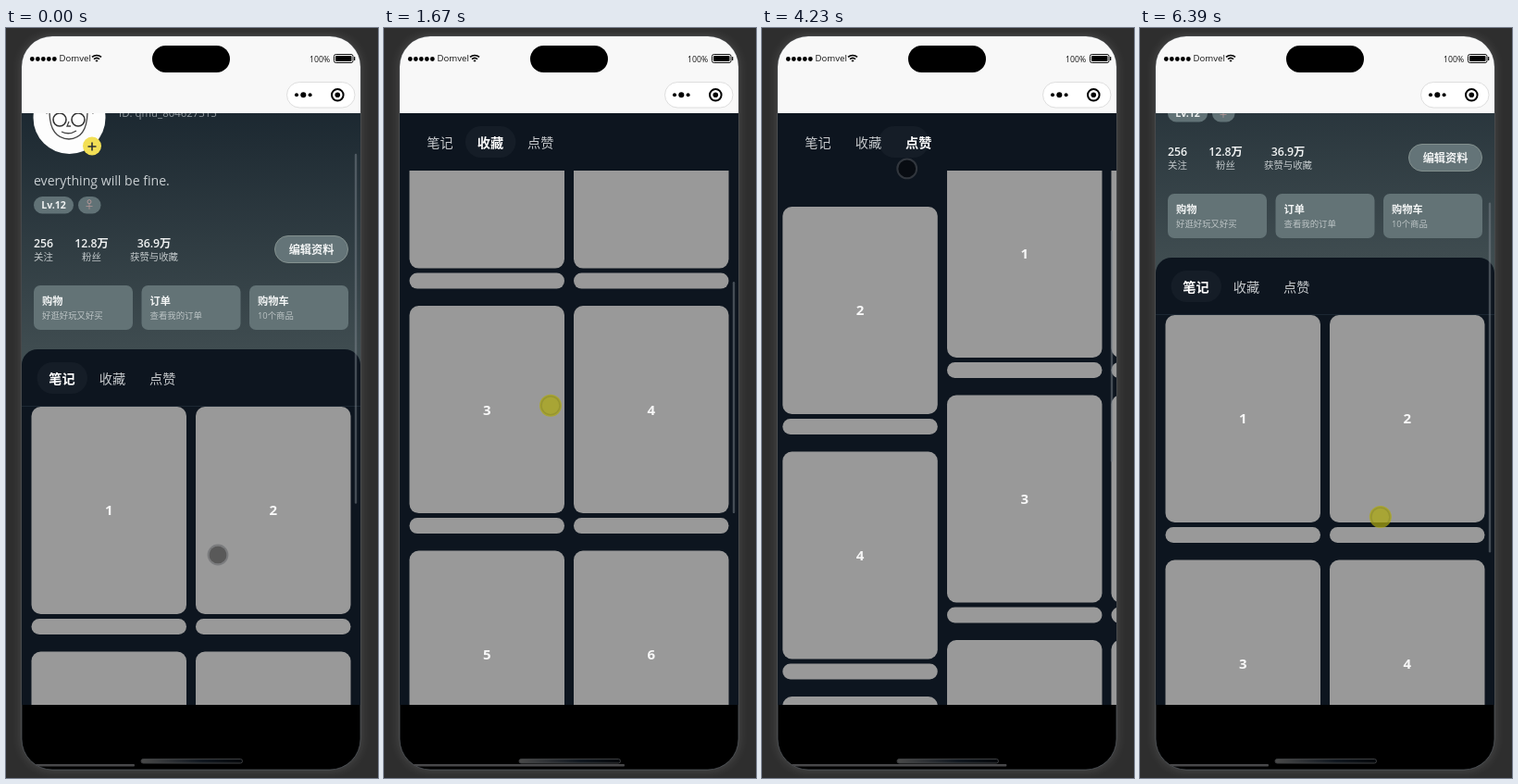
Write an HTML page with a canvas that moves like this. It is 402x810 px and loops after 6.46 s.

```html
<!DOCTYPE html>
<html lang="zh">
<head>
<meta charset="utf-8">
<style>
html, body { margin: 0; width: 100%; height: 100%; overflow: hidden; background: #2e2e2e; }
canvas { display: block; }
</style>
</head>
<body>
<canvas id="stage" width="402" height="810"></canvas>
<script>
const g = document.getElementById('stage').getContext('2d');
const LOOP = 6460, SLIDE = 500, LINGER = 510;
const LEFT = 17, WIDTH = 366, VIEW_TOP = 92, VIEW_BOTTOM = 731;
const STICK = 337, PAGE = 355.2, SHALLOW = 359, MID = 433, DEEP = 1130;
const TAB_X = 60.5, TAB_STEP = 54.4;
const FONT = '"Open Sans", "Noto Sans CJK SC", "Noto Sans CJK", sans-serif';

// A scene opens a tab at a scroll position; a hand with two points [time, x, y] drags the page
const scenes = [
  { at: 0, tab: 0, scroll: [82, MID], hand: [[100, 229, 569], [460, 232, 218]] },
  { at: 1040, tab: 1, scroll: [MID, DEEP], hand: [[1400, 180, 590], [1950, 180, 220]] },
  { at: 2080, tab: 2, scroll: [SHALLOW], hand: [[2430, 173, 245]] },
  { at: 3148, tab: 1, scroll: [DEEP], hand: [[3400, 112, 152]] },
  { at: 4124, tab: 2, scroll: [SHALLOW], hand: [[4230, 157, 152]] },
  { at: 4640, tab: 0, scroll: [DEEP], hand: [[5140, 70, 126]] },
  { at: 5500, tab: 0, scroll: [MID, 82], hand: [[5800, 250, 279], [LOOP, 261, 557]] }
];
scenes.forEach((s, i) => {
  s.from = i ? scenes[i - 1].tab : 0;
  s.tap = s.from !== s.tab;
});

const tabX = i => TAB_X + i * TAB_STEP;
const handPath = scenes.flatMap(({ at, tab, tap, hand }) => {
  const [, x, y] = hand[0];
  const opening = tap ? [[at - 80, tabX(tab) + 3, 128], [at, tabX(tab) + 3, 128]] : [[at, x, y]];
  return [...opening, ...hand];
});

const mix = (a, b, u) => a + (b - a) * u;

function handAt(t) {
  const i = handPath.findIndex(p => p[0] > t), a = handPath[i - 1], b = handPath[i];
  const u = (t - a[0]) / (b[0] - a[0]);
  return [mix(a[1], b[1], u), mix(a[2], b[2], u)];
}

function stateAt(t) {
  const scene = scenes.findLast(s => s.at <= t), { at, tab, from, hand } = scene;
  const [start, end = start] = hand.map(p => p[0]);
  const drag = Math.min(1, Math.max(0, (t - start) / (end - start || 1)));
  const [a, b = a] = scene.scroll;
  const left = 1 - Math.min(1, (t - at) / SLIDE);
  const dragging = end > start && t > start;
  return {
    tab,
    scroll: mix(a, b, drag ** 3),
    page: mix(tab, from, left ** 3),
    pill: mix(tab, from, left ** 5),
    back: tab < from,
    recent: t < (dragging ? end : at) + LINGER,
    pressed: dragging && t < end || scenes.some(s => s.tap && Math.abs(t - s.at + 30) < 60)
  };
}

function path(x, y, w, h, r) {
  g.beginPath();
  g.roundRect(x, y, w, h, r);
}
function line(color, width) {
  g.strokeStyle = color;
  g.lineWidth = width;
  g.stroke();
}
function box(x, y, w, h, r, fill, stroke) {
  path(x, y, w, h, r);
  g.fillStyle = fill;
  g.fill();
  if (stroke) line(stroke, 1);
}
function disc(x, y, r, fill) {
  g.beginPath();
  g.arc(x, y, r, 0, 7);
  g.fillStyle = fill;
  g.fill();
}
function ring(x, y, r, color, width) {
  g.beginPath();
  g.arc(x, y, r, 0, 7);
  line(color, width);
}
function curve(d, color, width) {
  g.strokeStyle = color;
  g.lineWidth = width;
  g.stroke(new Path2D(d));
}
function text(s, x, y, size, color, weight = 400, align = 'left') {
  g.font = `${weight} ${size}px ${FONT}`;
  g.textAlign = align;
  g.fillStyle = color;
  g.fillText(s, x, y + size * .36);
}
function clipped(x, y, w, h, r, draw) {
  g.save();
  path(x, y, w, h, r);
  g.clip();
  draw();
  g.restore();
}

function avatar() {
  disc(68.5, 97, 39, '#fdfdfd');
  curve('M43 92 L47 86 L92 86 L95 92', '#222', 3);
  curve('M47 90 Q47 119 68 120 Q88 119 88 90 M68 101 L66 106 L70 106 M60 112 Q68 116 76 111', '#444', 1.3);
  ring(58, 99, 7, '#333', 1.6);
  ring(78, 99, 7, '#333', 1.6);
  disc(93, 127.5, 10, '#f2df55');
  curve('M88.5 128 H97.5 M93 123.5 V132.5', '#2c3035', 1.6);
}

function profile(scroll) {
  g.save();
  g.translate(0, 82 - scroll);
  const sky = g.createLinearGradient(0, 10, 0, 347);
  sky.addColorStop(0, '#111d27');
  sky.addColorStop(1, '#3f4c50');
  g.fillStyle = sky;
  g.fillRect(LEFT, 10, WIDTH, 380);
  avatar();
  text('ID: qmu_804627315', 122, 92, 11.4, '#929a9f');
  text('everything will be fine.', 30, 165, 14.1, '#c9cfd2', 500);
  box(30, 182, 43, 18.5, 9.2, '#617276');
  text('Lv.12', 51.5, 191.5, 10.6, '#eef1f1', 700, 'center');
  box(78, 182, 24.5, 18.5, 9.2, '#617276');
  text('♀', 90, 191, 11, '#b99a9a', 400, 'center');
  [['256', '关注', 40.5], ['12.8万', '粉丝', 92.5], ['36.9万', '获赞与收藏', 160]].forEach(([n, label, x]) => {
    text(n, x, 232.5, 12.3, '#f1f3f3', 600, 'center');
    text(label, x, 247.5, 10.4, '#c3c9cb', 400, 'center');
  });
  box(290.5, 224.5, 79, 29, 14.5, '#647478', '#84918f');
  text('编辑资料', 330, 239.5, 12.2, '#f3f5f5', 600, 'center');
  [['购物', '好逛好玩又好买'], ['订单', '查看我的订单'], ['购物车', '10个商品']].forEach(([a, b], i) => {
    const x = 30 + i * 116.5;
    box(x, 278, 107, 48, 7, '#637376');
    text(a, x + 9, 295, 11.2, '#f3f5f5', 700);
    text(b, x + 9, 311, 9.4, '#bcc4c5');
  });
  g.restore();
}

function cards(x, y, count) {
  for (let i = 0; i < count; i++) {
    const cx = x + 27.5 + i % 2 * 177.5, cy = y + (i >> 1) * 264.5;
    box(cx, cy, 167.5, 224, 10, '#999');
    box(cx, cy + 229, 167.5, 17, 8.5, '#999');
    text(i + 1, cx + 83.7, cy + 112, 15, '#f7f7f7', 700, 'center');
  }
}

function panel({ tab, scroll, page, pill, back }) {
  const top = VIEW_TOP + Math.max(0, STICK - scroll), bottom = top + 62;
  const stuck = top === VIEW_TOP;
  box(LEFT, top, WIDTH, 760, stuck ? 0 : [17, 17, 0, 0], '#0d151f');
  // Going back leaves the last page at its top, only partly loaded
  const pages = [[0, 5], [61, 10], back ? [scroll - STICK, 4] : [0, 10]];
  clipped(LEFT, bottom, WIDTH, 800, 0, () => pages.forEach(([shift, count], i) => {
    const x = (i - page) * PAGE;
    if (Math.abs(x) < 340) cards(x, 154 + STICK - scroll + shift, count);
  }));
  if (!stuck) {
    g.fillStyle = '#1c2732';
    g.fillRect(LEFT, bottom - 1, WIDTH, 1);
  }
  box(33.5 + pill * TAB_STEP, top + 14, 54.5, 34, 17, '#151d27');
  ['笔记', '收藏', '点赞'].forEach((s, i) => {
    const on = i === tab;
    text(s, tabX(i), top + 32.3, 14.2, on ? '#fff' : '#c6c9cc', on ? 700 : 500, 'center');
  });
}

function statusBar() {
  g.fillStyle = '#f8f8f8';
  g.fillRect(LEFT, 9, WIDTH, 83);
  for (let i = 0; i < 5; i++) disc(28.3 + i * 6, 33.5, 2.4, '#000');
  text('Domvel', 57.5, 33, 9.6, '#111');
  for (let r = 1.5; r < 8; r += 3) {
    g.beginPath();
    g.arc(98, 37, r, -2.3, -.84);
    line('#000', 1.6);
  }
  box(158, 19, 84, 29, 14.5, '#000');
  text('100%', 328, 33.5, 8.7, '#111');
  path(354.5, 28.5, 20.5, 9, 2);
  line('#111', 1);
  box(356, 30, 17.5, 6, 1, '#000');
  box(376, 31, 1.3, 4, .6, '#111');
  box(303.5, 58.5, 73.5, 27.5, 13.7, '#fff', '#dedede');
  for (let i = -1; i < 2; i++) disc(321.3 + i * 7.3, 72.3, i ? 2 : 3, '#000');
  ring(358.3, 72.3, 6.3, '#000', 2);
  disc(358.3, 72.3, 2.8, '#000');
}

function scrollbars({ tab, scroll, page, back, recent }) {
  if (!recent) return;
  const length = tab === 0 && scroll <= MID ? 378 : 250;
  box(376.8, VIEW_TOP + scroll * length / 709, 2.4, length, 1.2, 'rgba(125,132,140,.5)');
  if (back) return;
  const whole = Math.floor(page), part = page - whole;
  box(LEFT, 795, 121 * (1 + whole + part ** 5) + 1, 2.5, 1, '#48484a');
}

function homeIndicator() {
  const shade = g.createLinearGradient(146, 0, 256, 0);
  shade.addColorStop(0, '#4a4a4a');
  shade.addColorStop(.6, '#111820');
  shade.addColorStop(1, '#05070a');
  box(146, 789.5, 109.5, 4.5, 2.2, shade, '#3c3e40');
}

function cursor([x, y], pressed) {
  if (pressed) {
    disc(x, y, 12, 'rgba(176,172,12,.7)');
    ring(x, y, 10, 'rgba(125,125,40,.4)', 1.5);
  } else {
    disc(x, y, 9.5, 'rgba(0,0,0,.42)');
    ring(x, y, 10.4, 'rgba(88,90,94,.48)', 2);
  }
}

function draw(t) {
  const state = stateAt(t);
  const phone = [LEFT, 9, WIDTH, 792, 33];

  g.fillStyle = '#2e2e2e';
  g.fillRect(0, 0, 402, 810);
  g.shadowColor = 'rgba(255,255,255,.16)';
  g.shadowBlur = 12;
  box(...phone, '#000');
  g.shadowBlur = 0;
  g.shadowColor = 'transparent';

  path(...phone);
  line('rgba(100,108,116,.55)', 1);
  clipped(...phone, () => {
    clipped(LEFT, VIEW_TOP, WIDTH, VIEW_BOTTOM - VIEW_TOP, 0, () => {
      profile(state.scroll);
      panel(state);
    });
    statusBar();
    scrollbars(state);
    homeIndicator();
    cursor(handAt(t), state.pressed);
  });
}

const begin = performance.now();
function tick() {
  draw((performance.now() - begin) % LOOP);
  requestAnimationFrame(tick);
}
tick();
</script>
</body>
</html>
```
